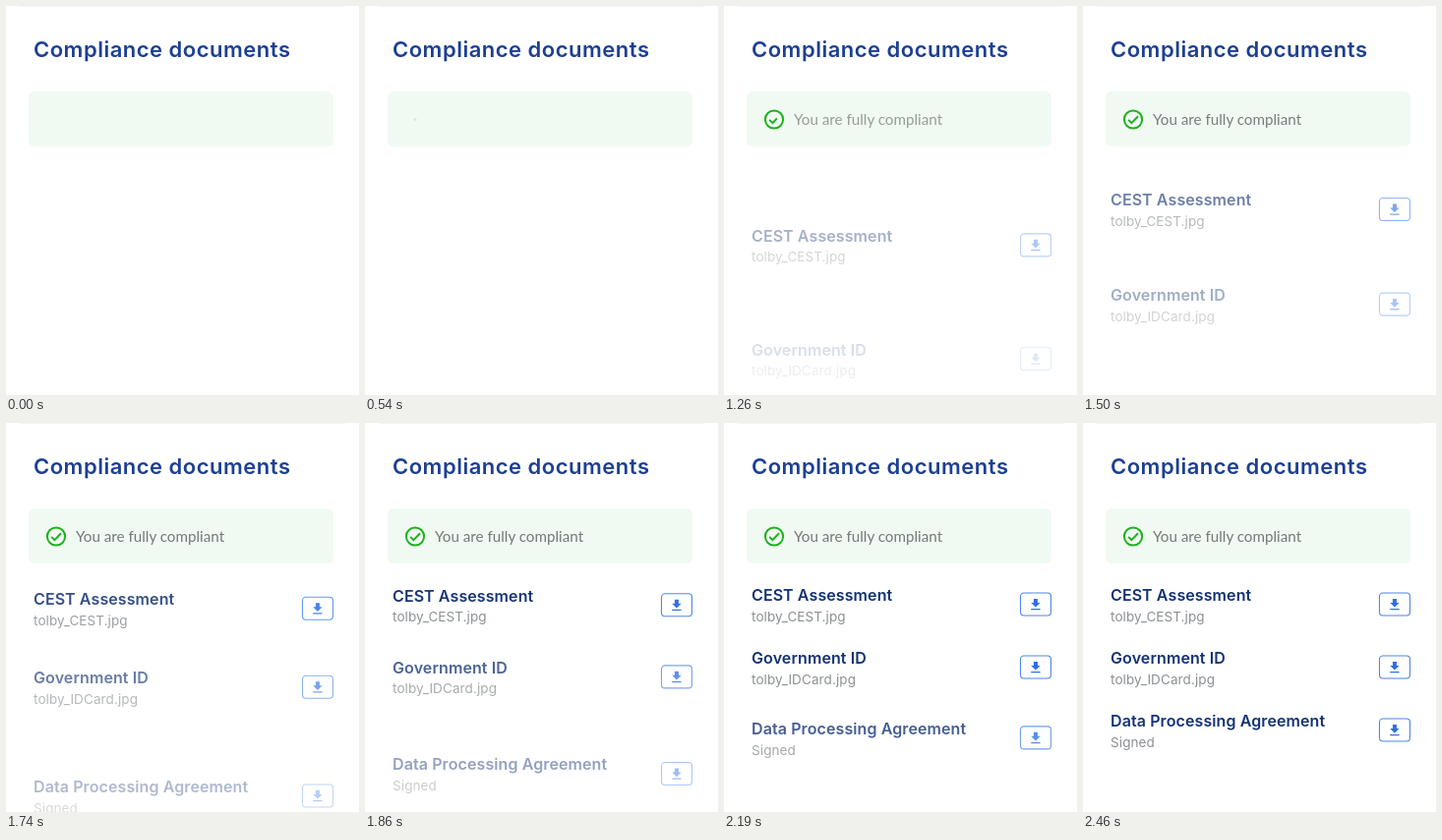
Recreate the animation shown at these times as an HTML page. Size 359 by 396 pixels, loop 2.91 s.

```html
<!DOCTYPE html>
<html lang="en">
<head>
<meta charset="utf-8">
<title>Compliance documents</title>
<style>
  html, body { margin: 0; width: 100%; height: 100%; overflow: hidden; background: #fff; }
  svg { display: block; width: 100%; height: 100%; }
  text { font-family: Inter, sans-serif; }
  .heading { font-size: 22px; font-weight: 600; letter-spacing: .5px; fill: #1c3f94; }
  .notice { font: 15.2px Lato, sans-serif; fill: #737a77; }
  .name { font-size: 16px; font-weight: 600; letter-spacing: .1px; fill: #133275; }
  .file { font-size: 13.5px; letter-spacing: .1px; fill: #8b9093; }
  .tick { fill: none; stroke: #1fb01f; stroke-width: 2; }
</style>
</head>
<body>
<svg viewBox="0 0 359 396" xmlns="http://www.w3.org/2000/svg">
  <rect x="14" width="331" height="1" fill="#f5f5f5"/>
  <text class="heading" x="28" y="51.8">Compliance documents</text>
  <rect x="23" y="87" width="310" height="56" rx="6" fill="#f0faf2"/>
  <g id="badge" class="tick">
    <circle r="9.1"/>
    <path id="check" d="M-4.8 .4 L-1.6 3.6 L5 -3.2" pathLength="1" stroke-dasharray="1 2"/>
  </g>
  <text id="notice" class="notice" x="71" y="120.8">You are fully compliant</text>
  <g id="rows"></g>
</svg>
<script>
const LOOP = 2910;
const SLIDE = 1000;
const DROP = 130;
const FADE_LEAD = 90;
const $ = id => document.getElementById(id);
const clamp = v => Math.min(1, Math.max(0, v));
const progress = (t, start, length) => clamp((t - start) / length);
const smooth = p => p * p * (3 - 2 * p);

const docs = [
  { name: 'CEST Assessment', file: 'tolby_CEST.jpg', y: 172, start: 975 },
  { name: 'Government ID', file: 'tolby_IDCard.jpg', y: 236, start: 1195 },
  { name: 'Data Processing Agreement', file: 'Signed', y: 300, start: 1495 }
];

$('rows').innerHTML = docs.map(d => `<g>
  <text class="name" x="28" y="8.8">${d.name}</text>
  <text class="file" x="28" y="29.6">${d.file}</text>
  <rect x="301.5" y="1" width="31" height="23" rx="3.5" fill="none" stroke="#4a86ee" stroke-width="1.1"/>
  <path d="M19 9h-4V3H9v6H5l7 7 7-7zM5 18v2h14v-2z" fill="#2f6fe4"
    transform="translate(308.9 4.9) scale(.67)"/>
</g>`).join('');
const rows = [...$('rows').children];

function badgeScale(t) {
  if (t < 1050) return 0.1 + 1.2 * smooth(progress(t, 540, 510));
  return 1.3 - 0.3 * smooth(progress(t, 1050, 210));
}

function draw(t) {
  $('badge').setAttribute('transform', `translate(51 115.5) scale(${badgeScale(t)})`);
  $('badge').setAttribute('visibility', t < 540 ? 'hidden' : 'visible');
  $('check').setAttribute('stroke-dashoffset', 1 - progress(t, 780, 620));
  $('notice').setAttribute('opacity', progress(t, 540, 1000));
  docs.forEach((d, i) => {
    const p = progress(t, d.start, SLIDE);
    const y = d.y + DROP * Math.pow(1 - p, 2.35);
    rows[i].setAttribute('transform', `translate(0 ${y.toFixed(2)})`);
    rows[i].setAttribute('opacity', progress(t, d.start - FADE_LEAD, SLIDE));
  });
}

const began = performance.now();
function tick() {
  draw((performance.now() - began) % LOOP);
  requestAnimationFrame(tick);
}
tick();
</script>
</body>
</html>
```
